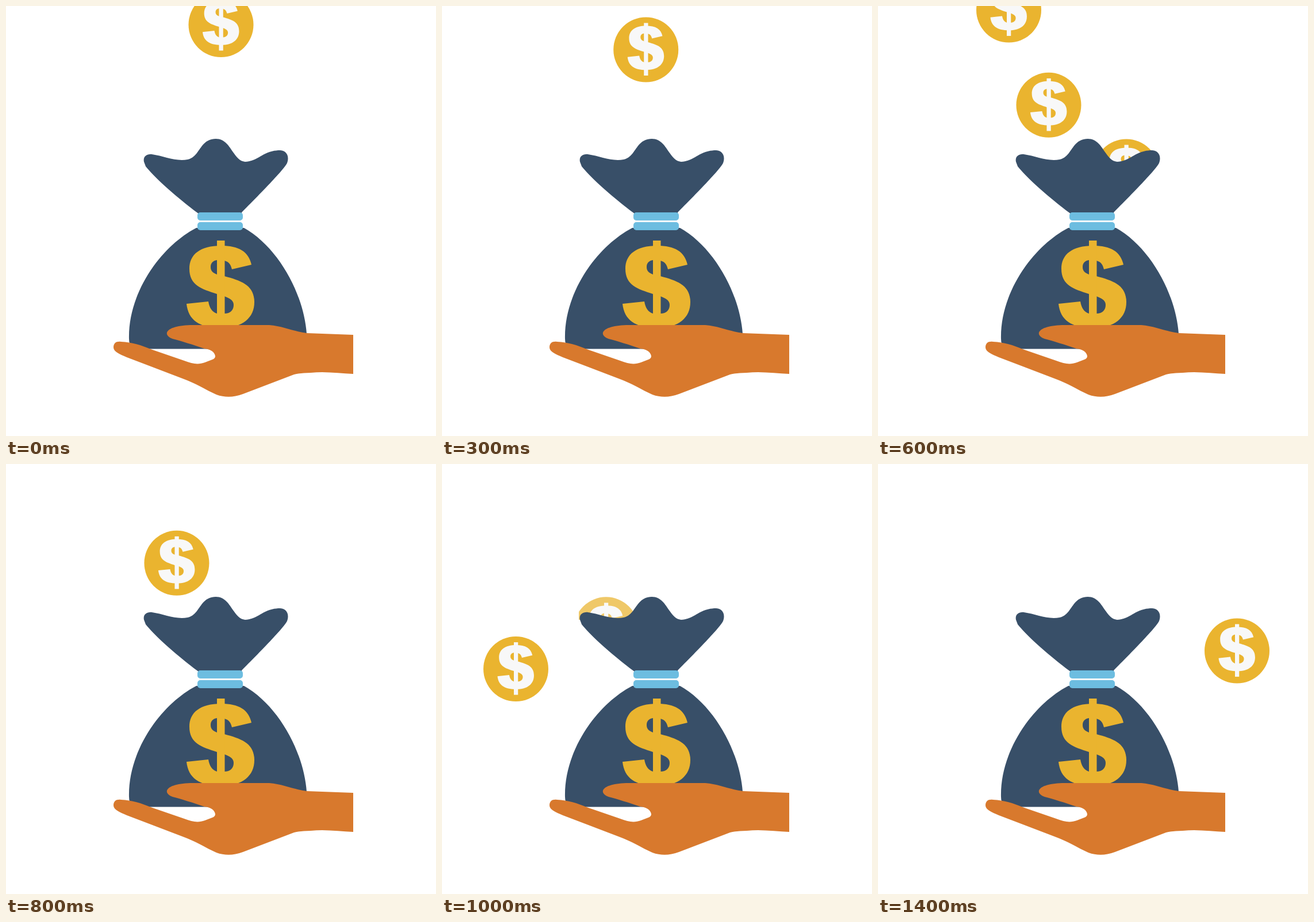
Recreate the animation shown at these times as an HTML page. Size 748 px wide and 748 px high, loop 1.5 s.

```html
<!DOCTYPE html>
<html lang="en">
<head>
<meta charset="utf-8">
<title>Coins and money bag</title>
<style>
html, body { margin: 0; height: 100%; overflow: hidden; background: #fff; }
svg { display: block; width: 100vw; height: 100vh; }
</style>
</head>
<body>
<svg viewBox="0 0 748 748">
  <defs>
    <clipPath id="mouth"><rect x="238" width="250" height="271"/></clipPath>
    <g id="dollar">
      <path d="M427 450C422 427 405 417 374 417C338 417 319 432 319 457C319 486 340 492 367 501L380 505C391 509 396 513 396 520C396 529 390 535 380 535L367 535C358 532 354 525 352 514L314 518C317 546 336 560 374 560C412 560 432 542 432 515C432 486 410 478 380 470L367 467C359 464 356 460 356 454C356 447 360 443 367 442L380 443C388 445 391 450 393 458Z"/>
      <rect x="367" y="408" width="13.5" height="170"/>
    </g>
    <g id="coin">
      <circle r="56.5" fill="#eab42f"/>
      <use href="#dollar" fill="#f8f8f8" transform="translate(0 -.7) scale(.538) translate(-373.5 -493)"/>
    </g>
  </defs>
  <g id="inside" clip-path="url(#mouth)"></g>
  <g id="outside"></g>
  <g fill="#384f68">
    <path d="M240 271C238 262 245 257 254 258C275 261 295 271 316 267C338 262 337 231 365 231C392 231 394 269 416 271C440 270 447 251 477 251C489 252 493 262 489 273C486 282 440 329 410 359V362H336C308 341 264 305 243 279Z"/>
    <path d="M331 386C268 419 212 500 214 579Q214 590 220 596.5H524L523 570C518 500 473 419 414 386Z"/>
  </g>
  <rect x="336" y="372" width="73" height="6" fill="#f4f8fa"/>
  <g fill="#6dbde0">
    <rect x="333" y="359" width="79" height="14" rx="5"/>
    <rect x="333" y="376" width="79" height="14" rx="5"/>
  </g>
  <use href="#dollar" fill="#eab42f"/>
  <path fill="#d8792d" d="M187 594C187 586 192 583 200 584C220 585 235 590 252 597L310 617C325 623 335 624 346 620L359 615Q364 613 364 609C363 602 356 597 345 596C325 589 305 583 290 579C282 576 279 572 280 568C283 560 300 555 325 555H458C482 557 500 566 523 569L604 572V640C580 639 555 635 530 638Q513 638 501 641L412 675Q388 684 366 676C348 668 330 656 307 648L210 611C198 606 187 601 187 594Z"/>
</svg>
<script>
const STEP = 100, STEPS = 15, DROP = 175;

// Drifts to the left with growing speed, rests over the bag, then sinks in and fades.
function curve(step) {
  const u = Math.min(step, 6), sink = Math.max(0, step - 8);
  return {
    x: 374 - 2.14 * u * u - 5.75 * sink,
    y: 32.5 + 5.67 * u + 2.94 * u * u + 57.75 * sink,
    alpha: 1 - 0.14 * sink
  };
}

// Straight fall at the common speed, with its own sideways drift.
const fall = (x, y, drift) => n => ({ x: x + drift * n, y: y + DROP * n, alpha: 1 });

function coin(layer, first, last, path) {
  const el = document.createElementNS("http://www.w3.org/2000/svg", "use");
  el.setAttribute("href", "#coin");
  document.getElementById(layer).appendChild(el);
  return { el, first, last, path };
}

const coins = [
  coin("inside", 0, 10, curve),
  coin("inside", 5, 6, fall(419, 113, 13)),
  coin("outside", 6, 7, fall(227.5, 7, -49.5)),
  coin("outside", 9, 10, fall(178, 181.5, -49.5)),
  coin("outside", 12, 14, fall(538, -25, 43.25))
];

function draw(ms) {
  const step = Math.floor(ms / STEP) % STEPS;
  for (const { el, first, last, path } of coins) {
    const { x, y, alpha } = path(step - first);
    el.style.display = step >= first && step <= last ? "" : "none";
    el.setAttribute("transform", `translate(${x} ${y})`);
    el.setAttribute("opacity", alpha);
  }
}

const start = performance.now();
function tick() {
  draw(performance.now() - start);
  requestAnimationFrame(tick);
}
tick();
</script>
</body>
</html>
```
